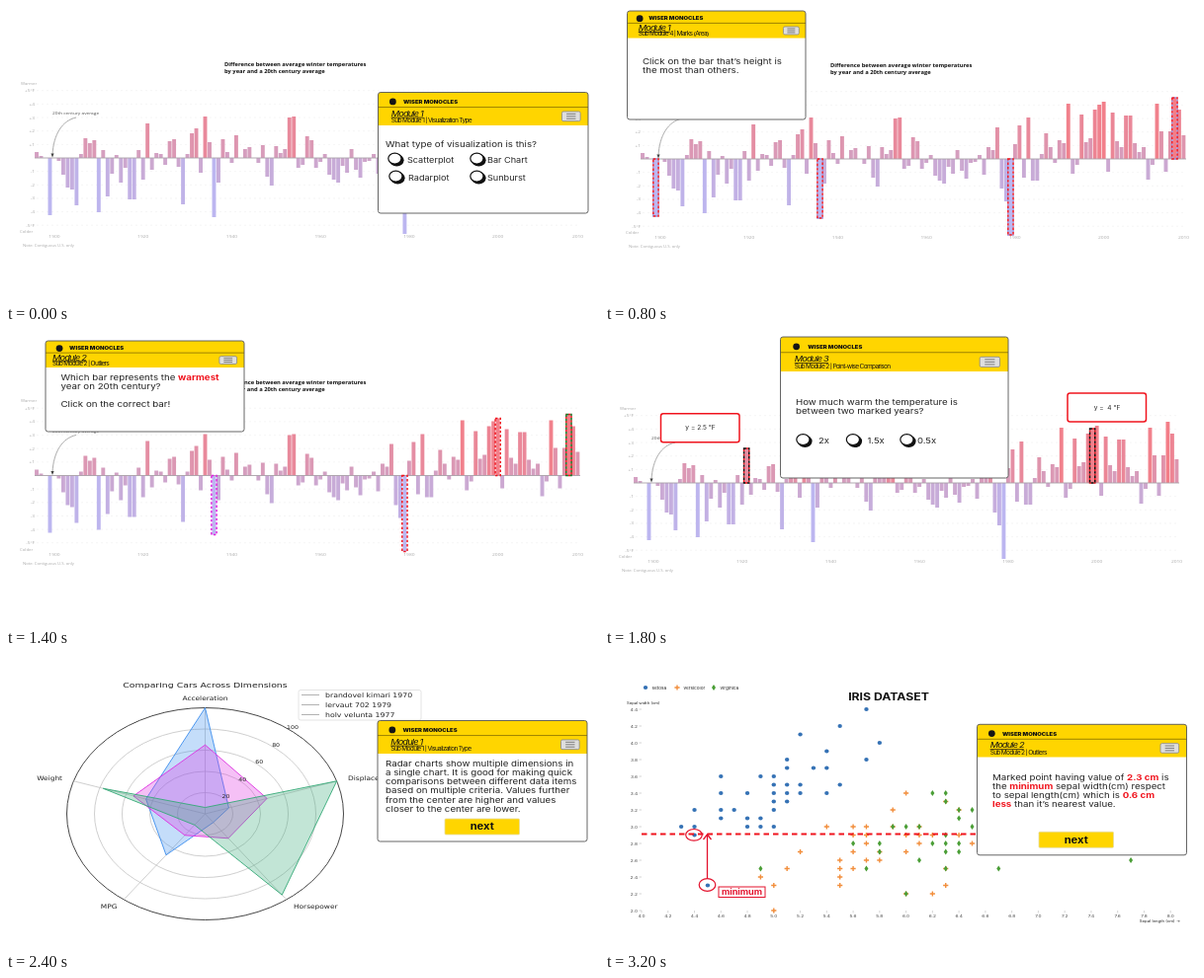
These frames come from a looping animation (600x300 px, 3400 ms). An HTML page:

```html
<!DOCTYPE html>
<html lang="en">
<head>
<meta charset="utf-8">
<title>Chart lessons</title>
<style>
html, body { margin: 0; width: 100%; height: 100%; overflow: hidden; background: #fff; }
svg { display: block; width: 100%; height: 100%; }
text { white-space: pre; }
</style>
</head>
<body>
<svg id="stage" viewBox="0 0 600 300" preserveAspectRatio="none"></svg>
<script>
const STEP = 200, LOOP = 3400;
const WIDE = 1.2; // the stage is wider than the lettering was set for
const INTER = 'Inter, sans-serif', OPEN = "'Open Sans', sans-serif", DEJA = "'DejaVu Sans', sans-serif";
const RED = '#f0141e', YELLOW = '#ffd500';

const rich = s => s.replace(/\*(.+?)\*/g, `<tspan fill="${RED}" font-weight="700">$1</tspan>`);

function text(x, y, s, size, o = {}) {
  const { font = INTER, fill = '#222', weight = 400, anchor = 'start', wide = WIDE, extra = '' } = o;
  return `<text transform="translate(${x} ${y}) scale(${wide} 1)" font-family="${font}" font-size="${size}"
    fill="${fill}" font-weight="${weight}" text-anchor="${anchor}" ${extra}>${rich(s)}</text>`;
}
const rect = (x, y, w, h, fill, extra = '') =>
  `<rect x="${x}" y="${y}" width="${w}" height="${h}" fill="${fill}" ${extra}/>`;
const path = (d, stroke, width = 1, extra = '') =>
  `<path d="${d}" fill="none" stroke="${stroke}" stroke-width="${width}" ${extra}/>`;
const ellipse = (x, y, rx, ry, fill, extra = '') =>
  `<ellipse cx="${x}" cy="${y}" rx="${rx}" ry="${ry}" fill="${fill}" ${extra}/>`;

/* ---- bar chart ---- */
const ZERO = 154, UNIT = 13.65;
const barX = i => 31 + 4.487 * i;
const heights = [
  6, 2, 0, -58, 0, -3, -17, -30, -32, -48, 4, 20, 15, 18, -55, 8, -39, -16, 3, -25,
  -10, -42, -42, 8, -22, 35, -12, 5, 4, -7, 17, 19, -9, -47, 4, 25, 30, -15, 42, 16,
  -60, -25, 19, 6, -5, 23, 0, 9, 11, 0, -5, 13, -19, -28, 12, 5, 9, 41, 42, -10,
  -7, 22, 18, -10, -4, 4, -17, -22, -25, -8, -15, 9, -12, -20, -4, -3, 4, -16, 12, 9,
  32, -30, -43, -77, 15, 34, -19, 42, -22, -22, 5, 26, 12, -4, 19, 16, 56, -15, -6, 45,
  17, 21, 50, 55, 58, -13, 47, 18, 12, 44, 44, 16, 7, 12, -21, -6, 56, 28, -13, 28,
  62, 50, 24];

function tint(h) {
  const mid = [208, 164, 200], end = h < 0 ? [188, 182, 240] : [243, 126, 136];
  const k = Math.min(1, Math.abs(h) / (h < 0 ? 58 : 60));
  return `rgb(${mid.map((m, j) => Math.round(m + (end[j] - m) * k))})`;
}

function barChart(dx, dy, over = '') {
  const grey = { font: OPEN, fill: '#aaa' };
  let s = '';
  for (let v = -5; v <= 5; v++) {
    const y = ZERO - v * UNIT;
    if (!v) continue;
    s += path(`M31 ${y}H581`, '#efefef', .6, 'stroke-dasharray="2 3"');
    s += text(29, y + 1.5, (v > 0 ? '+' : '') + v + (Math.abs(v) == 5 ? '°F' : ''), 4, { ...grey, anchor: 'end' });
  }
  heights.forEach((h, i) => {
    if (h) s += rect(barX(i) - 1.95, h > 0 ? ZERO - h : ZERO, 3.9, Math.abs(h), tint(h));
  });
  s += path(`M29 ${ZERO}H581`, '#a9a0a8', .9);
  for (let y = 1900; y <= 2000; y += 20) s += text(barX(y - 1896), 235.3, '' + y, 4.1, { ...grey, anchor: 'middle' });
  s += text(578.5, 235.3, '2010', 4.1, { ...grey, anchor: 'middle' });
  s += text(15, 79.5, 'Warmer', 3.6, grey) + text(14, 230, 'Colder', 3.6, grey);
  s += text(17, 244.3, 'Note: Contiguous U.S. only', 3.5, grey);
  s += text(47, 110, '20th century average', 4, { font: OPEN, fill: '#555' });
  s += path('M71 113C57 116 48 130 47 151', '#888', .7) + '<path d="M45.4 149.5h3.2l-1.6 4z" fill="#444"/>';
  const head = { font: OPEN, weight: 700, fill: '#111', wide: 1 };
  s += text(221, 61.3, 'Difference between average winter temperatures', 5.8, head);
  s += text(221, 68.3, 'by year and a 20th century average', 5.8, head);
  return `<g transform="translate(${dx} ${dy})">${s}${over}</g>`;
}

function mark(i, color, under) {
  const h = heights[i], x = barX(i) - 2.6, y = h > 0 ? ZERO - h : ZERO;
  const box = (c, off) => rect(x, y, 5.2, Math.abs(h), 'none',
    `stroke="${c}" stroke-width="1.5" stroke-dasharray="2.4 2" stroke-dashoffset="${off}"`);
  return (under ? box(under, 2.2) : '') + box(color, 0);
}
const callout = (x, y, s) =>
  rect(x, y, 79.5, 29, '#fff', `rx="2.5" stroke="${RED}" stroke-width="1.5"`) +
  text(x + 40, y + 16.6, s, 5.5, { anchor: 'middle' });

/* ---- radar chart ---- */
const CX = 201.5, CY = 162, RX = 140, RY = 107.5;
const spoke = (i, r) => {
  const a = i * Math.PI * .4;
  return [CX + RX * r * Math.sin(a), CY - RY * r * Math.cos(a)];
};
// order: acceleration, displacement, horsepower, MPG, weight
const cars = [
  ['#3d8eee', [1, .18, .1, .48, .45]],
  ['#dd2fe0', [.65, .47, .285, .25, .545]],
  ['#35aa78', [.06, 1, .945, .13, .775]]];

function radar() {
  const o = { font: DEJA }, end = { font: DEJA, anchor: 'end' };
  let s = '';
  for (let k = 1; k <= 5; k++)
    s += ellipse(CX, CY, RX * k / 5, RY * k / 5, 'none', `stroke="${k == 5 ? '#333' : '#bbb'}" stroke-width="${k == 5 ? .9 : .7}"`);
  for (let i = 0; i < 5; i++) s += path(`M${CX} ${CY}L${spoke(i, 1)}`, '#bbb', .7);
  for (const [c, v] of cars)
    s += `<polygon points="${v.map((r, i) => spoke(i, r)).join(' ')}" fill="${c}" fill-opacity=".3" stroke="${c}" stroke-width=".9"/>`;
  for (let k = 1; k <= 5; k++)
    s += text(205.5 + 16.9 * k, 163.5 - 17.5 * k, '' + 20 * k, 5.2, { font: DEJA, anchor: 'middle' });
  s += text(201.5, 33.5, 'Comparing Cars Across Dimensions', 7.8, { font: DEJA, anchor: 'middle' });
  s += text(201.5, 47.3, 'Acceleration', 6.2, { font: DEJA, anchor: 'middle' });
  s += text(346, 128.3, 'Displacement', 6.2, o) + text(291, 258, 'Horsepower', 6.2, o);
  s += text(112.5, 258, 'MPG', 6.2, end) + text(57, 128.3, 'Weight', 6.2, end);
  s += rect(296, 36.5, 124, 30.5, '#fff', 'rx="2" stroke="#ddd" stroke-width=".8"');
  ['brandovel kimari 1970', 'lervaut 702 1979', 'holv velunta 1977'].forEach((n, i) => {
    s += path(`M299 ${41.5 + 10 * i}h18`, '#aaa', .9) + text(323, 44 + 10 * i, n, 6.5, o);
  });
  return s;
}

/* ---- scatter plot ---- */
const px = v => 37 + (v - 4) * 133.8, py = v => 260 - (v - 2) * 85;
const shapes = {
  setosa: (x, y) => ellipse(x, y, 2.2, 1.9, '#3572b5'),
  versicolor: (x, y) => path(`M${x - 2.6} ${y}h5.2M${x} ${y - 2.6}v5.2`, '#f28e3c', 1.4),
  virginica: (x, y) => `<path d="M${x} ${y - 3}l2 3-2 3-2-3z" fill="#4a9e36"/>`
};
// each row: sepal width, then sepal lengths
const iris = {
  setosa: [[4.4, 5.7], [4.2, 5.5], [4.1, 5.2], [4, 5.8], [3.9, 5.4], [3.8, 5.1, 5.7], [3.7, 5.1, 5.3, 5.4],
    [3.6, 4.6, 4.9, 5], [3.5, 5, 5.1, 5.2, 5.5], [3.4, 4.6, 4.8, 5, 5.1, 5.2, 5.4], [3.3, 5, 5.1],
    [3.2, 4.4, 4.6, 4.7, 5], [3.1, 4.6, 4.8, 4.9], [3, 4.3, 4.4, 4.8, 4.9, 5], [2.9, 4.4], [2.3, 4.5]],
  versicolor: [[3.4, 6], [3.3, 6.3], [3.2, 5.9, 6.4], [3, 5.4, 5.6, 5.7, 5.9, 6.1], [2.9, 5.6, 5.7, 6, 6.1, 6.2, 6.4],
    [2.8, 5.7, 6.1, 6.5], [2.7, 5.2, 5.6, 5.8, 6], [2.6, 5.5, 5.7, 5.8], [2.5, 5.1, 5.5, 5.6, 6.3], [2.4, 4.9, 5.5],
    [2.3, 5, 5.5, 6.3], [2.2, 6, 6.2], [2, 5]],
  virginica: [[3.4, 6.2, 6.3], [3.3, 6.3], [3.2, 6.4, 6.5], [3.1, 6.4], [3, 5.9, 6, 6.1, 6.5], [2.9, 6.3],
    [2.8, 5.6, 5.8, 6.2, 6.3, 6.4], [2.7, 5.8, 6.3, 6.4], [2.6, 6.1, 7.7], [2.5, 4.9, 5.7, 6.3, 6.7], [2.2, 6]]
};

function scatter() {
  const small = { anchor: 'middle', fill: '#444' }, rose = '#e3122d';
  let s = '';
  for (let i = 0; i <= 12; i++) {
    const v = 2 + i * .2;
    s += text(33, py(v) + 1.5, v.toFixed(1), 4, { ...small, anchor: 'end' }) + path(`M34.5 ${py(v)}h2.5`, '#aaa', .5);
  }
  for (let i = 0; i <= 20; i++) {
    const v = 4 + i * .2;
    s += text(px(v), 267, v.toFixed(1), 4, small) + path(`M${px(v)} 260v2.5`, '#aaa', .5);
  }
  s += text(22, 50.5, 'Sepal width (cm)', 3.5) + text(582, 271.5, 'Sepal length (cm) →', 3.6, { anchor: 'end' });
  s += text(287, 47, 'IRIS DATASET', 10.2, { weight: 700, anchor: 'middle', fill: '#111' });
  [['setosa', 41], ['versicolor', 73], ['virginica', 110]].forEach(([n, x]) => {
    s += shapes[n](x, 34) + text(x + 6.5, 35.5, n, 3.9);
    for (const [w, ...lens] of iris[n]) for (const l of lens) s += shapes[n](px(l), py(w));
  });
  s += path('M37 182.5H376', RED, 1.8, 'stroke-dasharray="5.5 4"');
  s += ellipse(90, 183.3, 8.3, 5.8, 'none', `stroke="${rose}" stroke-width="1.2"`);
  s += ellipse(103.5, 234, 8.3, 6.3, 'none', `stroke="${rose}" stroke-width="1.2"`);
  s += path('M103.5 227.5V183M99.5 188L103.5 182.8L107.5 188', rose, 1.3);
  s += rect(115, 236, 47, 10.5, '#fff', `stroke="${rose}" stroke-width="1"`);
  return s + text(138.5, 244, 'minimum', 7.6, { fill: rose, weight: 700, anchor: 'middle' });
}

/* ---- lesson panel ---- */
function panel(x, y, w, h, head, mod, sub, body = '', inset = .062 * w) {
  const bx = x + w * .875, by = y + head * .58, bw = w * .088, bh = head * .29;
  let s = rect(x, y, w, h, '#fff', 'rx="2.5"');
  s += `<path d="M${x} ${y + head}v${3 - head}q0-3 3-3h${w - 6}q3 0 3 3v${head - 3}z" fill="${YELLOW}"/>`;
  s += path(`M${x} ${y + head * .45}h${w}`, '#5a4b00', .6);
  s += rect(x, y, w, h, 'none', 'rx="2.5" stroke="#555" stroke-width=".9"');
  s += ellipse(x + w * .07, y + head * .28, 3.4, 3.4, '#151515');
  s += text(x + w * .12, y + head * .345, 'WISER MONOCLES', 4.9, { weight: 900, fill: '#111' });
  s += text(x + inset, y + head * .725, mod, 7.7, { fill: '#111', extra: 'font-style="italic" text-decoration="underline" letter-spacing="-.7"' });
  s += text(x + inset, y + head * .915, sub, 5.5, { fill: '#111', extra: 'letter-spacing="-.58"' });
  s += rect(bx, by, bw, bh, '#dedede', 'rx="1.5" stroke="#888" stroke-width=".8"');
  for (let i = 1; i < 4; i++) s += path(`M${bx + bw * .25} ${by + bh * i / 4}h${bw * .5}`, '#666', .8);
  return s + body;
}
const lines = (x, y, ...rows) => rows.map((r, i) => text(x, y + 9.15 * i, r, 8.1)).join('');
const radio = (x, y, s, gap = 12, size = 7.6) =>
  ellipse(x + 1.3, y + 1.3, 7.3, 6.2, '#111') +
  ellipse(x - .6, y - .4, 6.6, 5.4, '#fff', 'stroke="#111" stroke-width="1.2"') +
  text(x + gap, y + 3.5, s, size);
const next = (x, y) => rect(x, y, 75.5, 16, YELLOW, 'rx="1" stroke="#e6dca0" stroke-width=".8"') +
  text(x + 37.7, y + 11.3, 'next', 9.3, { weight: 700, fill: '#111', anchor: 'middle' });

const TYPE = 'Sub Module 1 | Visualization Type', AXES = 'Sub Module 2 | Axes and Variables',
  AREA = 'Sub Module 4 | Marks (Area)', OUT = 'Sub Module 2 | Outliers', POINT = 'Sub Module 2 | Point-wise Comparison';
const ask = (x, y, dx = 0) => lines(x, y, 'What type of visualization is this?') +
  radio(x + 10, y + 12, 'Scatterplot') + radio(x + 93, y + 12, 'Bar Chart', 10) +
  radio(x + 11, y + 30, 'Radarplot') + radio(x + 93, y + 30, 'Sunburst', 10);
const about = (x, y) => lines(x, y, 'Radar charts show multiple dimensions in', 'a single chart. It is good for making quick',
  'comparisons between different data items', 'based on multiple criteria. Values further',
  'from the center are higher and values', 'closer to the center are lower.');

/* ---- one scene per step ---- */
const scenes = [
  barChart(0, 0) + panel(376.5, 87.5, 212.5, 122.5, 33.5, 'Module 1', TYPE, ask(384, 143)),
  barChart(-3, 0) + panel(376.5, 4, 212.5, 122.5, 33.5, 'Module 1', TYPE,
    lines(384, 55, 'Bar charts show values as the', 'height of each bar.') + next(444, 100)),
  barChart(0, .7, ellipse(31, 153, 12.5, 9.5, '#ff6a6a', 'opacity=".28"')) +
    panel(364.5, 62, 226, 139, 38, 'Module 1', AXES, lines(379, 134.3, 'Click at the *origin* point of the axes.')),
  barChart(-6, 7) + panel(364.5, 5.5, 226, 110, 34, 'Module 1', 'Sub Module 3 | Marks',
    lines(379, 66, 'Click on the bar that’s height is', 'the most than others.')),
  barChart(7, 1, [3, 40, 83, 120].map(i => mark(i, RED, '#9a8fd8')).join('')) +
    panel(22.5, 5, 180.5, 110, 27.5, 'Module 1', AREA,
      lines(38, 58.7, 'Click on the bar that’s height is', 'the most than others.')),
  barChart(-6, 0) + panel(376.5, 71, 212.5, 122.5, 33.5, 'Module 2', 'Sub Module 1 | Outliers',
    lines(387, 128, 'Click on the correct bar!')),
  barChart(0, 0, mark(83, RED)) + panel(376.5, 71, 212, 122.5, 33.5, 'Module 2', OUT,
    lines(387, 128, 'Click on the correct bar!')),
  barChart(0, -6.5, mark(40, '#e020e0') + mark(83, RED) + mark(104, RED) + mark(120, '#147a28', RED)) +
    panel(40, 11, 201, 92, 27, 'Module 2', OUT,
      lines(55.5, 51, 'Which bar represents the *warmest*', 'year on 20th century?', '', 'Click on the correct bar!'), 7),
  barChart(0, -8) + panel(177.5, 11, 230, 110, 35, 'Module 3', 'Sub Module 1 | Comparison',
    lines(193, 76, 'Click on the correct bar!')),
  barChart(0, 1, mark(25, '#111', RED) + mark(103, '#111', RED) ) + callout(56.5, 84.8, 'y = 2.5 °F') + callout(468, 64, 'y =  4 °F') +
    panel(177.5, 7, 230.5, 143, 35, 'Module 3', POINT,
      lines(193, 76.3, 'How much warm the temperature is', 'between two marked years?') +
      radio(201, 111.5, '2x', 15, 7.9) + radio(251.5, 111.5, '1.5x', 14, 7.9) + radio(306, 111.5, '0.5x', 10, 7.9)),
  radar() + panel(367, 67.5, 212, 122.5, 33.5, 'Module 1', TYPE, ask(375, 123)),
  radar() + panel(367, 67.5, 212, 122.5, 33.5, 'Module 1', TYPE, about(375, 114)),
  radar() + panel(376, 67.5, 212, 122.5, 33.5, 'Module 1', TYPE, about(384, 114) + next(444, 167)),
  radar() + panel(364.5, 62, 225, 139, 38, 'Module 1', AXES, lines(379, 134.3, 'Click at the *origin* point of the axes.')),
  radar() + panel(22, 38.5, 180.5, 110, 27.5, 'Module 1', AREA,
    lines(38, 92, 'Click on the area that’s', 'the most than others.')),
  radar() + panel(376, 71, 212, 122.5, 33.5, 'Module 2', OUT, lines(392, 128, 'Click on the correct area!')),
  scatter() + panel(376.5, 71.3, 212, 132.5, 33.3, 'Module 2', OUT,
    lines(392, 127.8, 'Marked point having value of *2.3 cm* is', 'the *minimum* sepal width(cm) respect',
      'to sepal length(cm) which is *0.6 cm*', '*less* than it’s nearest value.') + next(439, 180.3))
];

const stage = document.getElementById('stage');
stage.innerHTML = scenes.map(s => `<g display="none">${s}</g>`).join('');
let shown = -1;
function draw(now) {
  const i = Math.floor(now % LOOP / STEP);
  if (i !== shown) {
    if (shown >= 0) stage.children[shown].setAttribute('display', 'none');
    stage.children[i].removeAttribute('display');
    shown = i;
  }
}
function tick() {
  draw(performance.now());
  requestAnimationFrame(tick);
}
tick();
</script>
</body>
</html>
```
